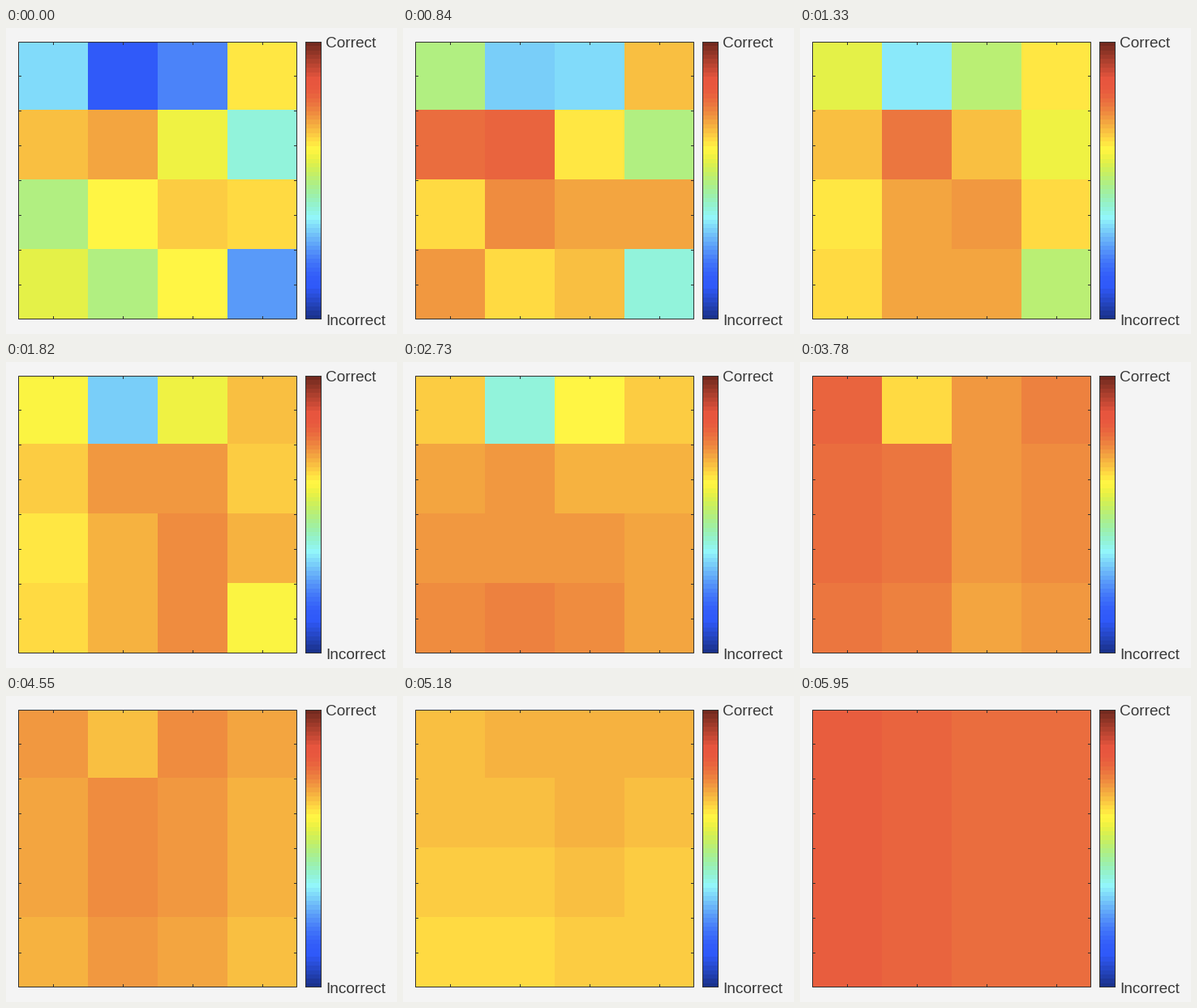
Recreate the animation shown at these times as a matplotlib script. Size 482 by 378 pixels, loop 7490 ms.

```python
import matplotlib.pyplot as plt
import numpy as np
from matplotlib.animation import FuncAnimation
from matplotlib.patches import Rectangle

W, H, DPI = 482, 378, 100
PX = 72 / DPI  # one pixel in points
STEP_MS, FRAMES = 70, 107
LEVELS = 64
INK = "#303030"
LEFT, RIGHT, TOP, BOTTOM = 15, 359, 17, 360

# Bursts of change as (first frame, number of steps)
BURSTS = [(1, 9), (11, 10), (23, 6), (30, 6), (39, 3), (46, 3),
          (52, 4), (59, 4), (65, 6), (73, 5), (80, 3), (84, 2)]

# The opening scores, and how the whole grid then develops by step count
OPENING = np.array([[21, 8, 14, 40], [43, 45, 37, 25],
                    [31, 39, 42, 41], [36, 31, 39, 16]])
STEPS = [0, 11, 23, 32, 40, 53, 61]
COURSE = {
    "mean": [31.8, 38.8, 43, 45, 48, 42.6, 50.7],
    "lag": [23.8, 19.5, 22, 18, 8.5, 0, 0],
    "tilt": [0, 0.7, 0.4, 1.6, -0.5, -0.9, 0],
    "swell": [0, 2.9, 3, 0.6, 2.2, 0.6, 1.1],
    "crest": [0.4, 0.4, 2, 1, 0.25, 2.3, 0.25],
}

ROW, COL = np.mgrid[0:4, 0:4]
LEAD = OPENING - OPENING.mean()
LEAD /= np.abs(LEAD).max()


def make_palette():
    """Rainbow ramp, softened by mixing its channels in linear light."""
    i = np.arange(LEVELS)[:, None]
    ramp = np.clip(1.5 - np.abs(i - [47, 31, 15]) / 16, 0, 1)
    mix = np.array([[0.81, 0.27, 0.025], [0.09, 0.83, 0.10], [0.045, 0.01, 0.95]])
    return np.clip(ramp ** 2.2 @ mix.T, 0, 1) ** (1 / 2.2)


PALETTE = make_palette()


def steps_done(frame):
    return sum(min(max(frame - start + 1, 0), n) for start, n in BURSTS)


def grid_colors(frame):
    s = steps_done(frame)
    mean, lag, tilt, swell, crest = (np.interp(s, STEPS, v) for v in COURSE.values())
    power = max(1, (s - 6) / 5)  # small leads fade first, the laggard last
    level = mean + lag * np.sign(LEAD) * np.abs(LEAD) ** power
    level += tilt * (ROW - 1.5) + swell * np.cos(np.pi / 2 * (COL - crest))
    return PALETTE[np.clip(np.rint(level), 0, LEVELS - 1).astype(int)]


fig = plt.figure(figsize=(W / DPI, H / DPI), dpi=DPI, facecolor="#f4f4f4")
ax = fig.add_axes([0, 0, 1, 1])
ax.axis("off")


def picture(rgb, x0, x1, y0, y1):
    return ax.imshow(rgb, extent=(x0, x1, y1, y0), interpolation="nearest",
                     aspect="auto", origin="upper")


def frame_box(x0, x1, y0, y1):
    box = Rectangle((x0 + 0.5, y0 + 0.5), x1 - x0 - 1, y1 - y0 - 1,
                    fill=False, ec=INK, lw=PX, zorder=3, snap=False)
    return ax.add_patch(box)


def tick(x, y, dx, dy):
    ax.plot([x, x + dx], [y, y + dy], color=INK, lw=PX,
            solid_capstyle="butt", zorder=3, snap=False)


def label(y, text):
    ax.text(394.2, y, text, family="Liberation Sans", size=19 * PX,
            color="#383838", va="baseline")


heat = picture(grid_colors(0), LEFT, RIGHT, TOP - 1, BOTTOM)
picture(PALETTE[::-1, None, :], 369, 389, TOP, BOTTOM)
heat.set_clip_path(frame_box(LEFT, RIGHT, TOP, BOTTOM))
frame_box(369, 389, TOP, BOTTOM)

for i in range(4):
    x = int(LEFT + (i + 0.5) * (RIGHT - LEFT) / 4) + 0.5
    tick(x, TOP, 0, 4)
    tick(x, BOTTOM, 0, -4)
for i in range(1, 8):
    y = int(TOP + i * (BOTTOM - TOP) / 8) + 0.5
    tick(LEFT, y, 4, 0)
    tick(RIGHT, y, -4, 0)

label(24, "Correct")
label(367, "Incorrect")
ax.set_xlim(0, W)
ax.set_ylim(H, 0)


def update(frame):
    heat.set_data(grid_colors(frame))
    return [heat]


anim = FuncAnimation(fig, update, frames=FRAMES, interval=STEP_MS,
                     repeat=True, repeat_delay=0, blit=False)
plt.show()
```
